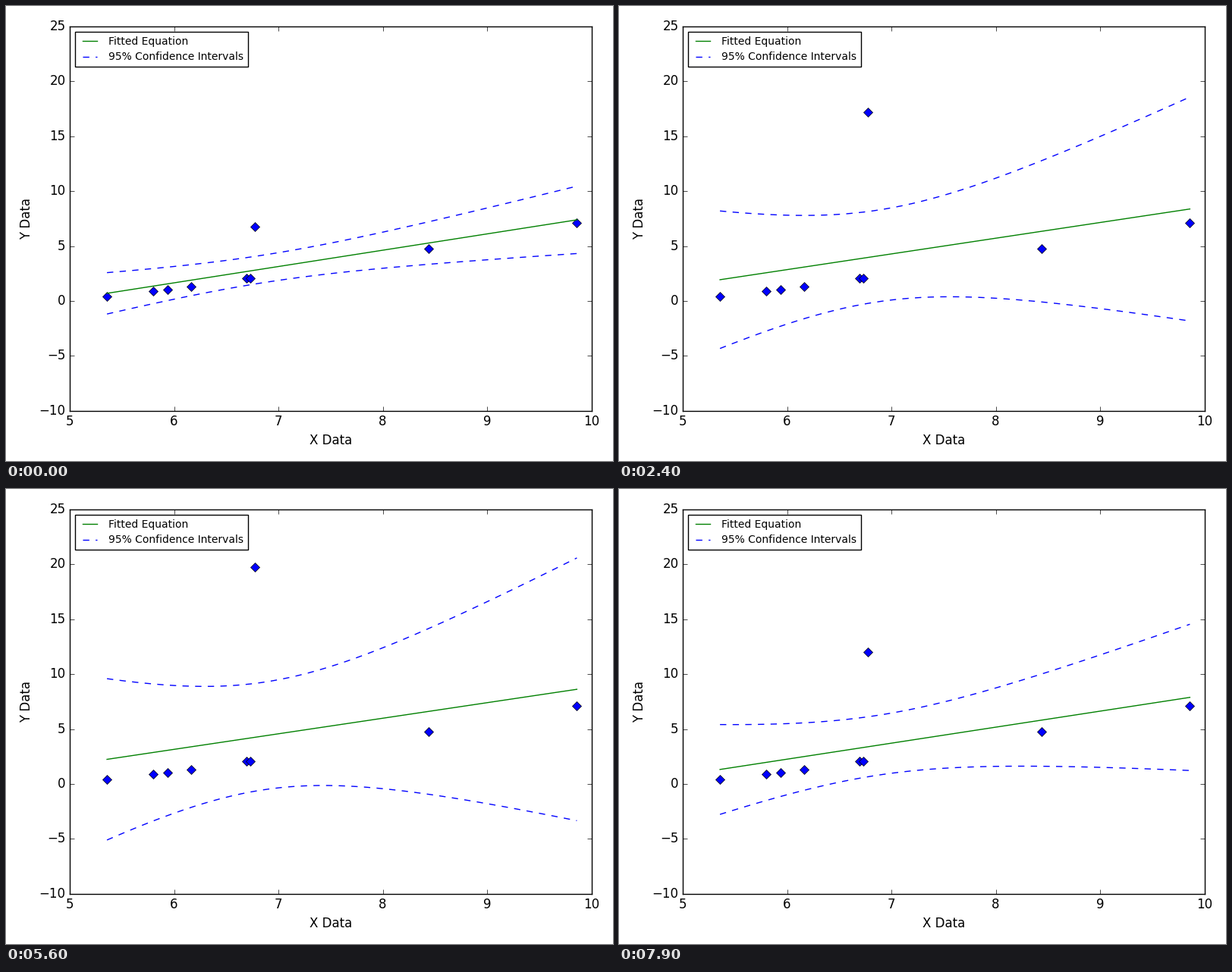
Write a matplotlib script that moves like this. It is 800 by 600 pixels and loops after 8 s.

```python
import numpy as np
import matplotlib.pyplot as plt
from matplotlib.animation import FuncAnimation

FRAMES = 80
INTERVAL = 100
T_95 = 2.364624  # two-sided 95% Student t, 7 degrees of freedom

X = np.array([5.357, 5.797, 5.936, 6.161, 6.697, 6.731, 6.775, 8.442, 9.861])
Y = np.array([0.376, 0.874, 1.049, 1.327, 2.054, 2.077, 2.138, 4.744, 7.104])
MOVING = 6
CENTER, SWING = 6.76, 14.0

plt.style.use("classic")
plt.rcParams["font.family"] = "DejaVu Sans"

WIDTH, HEIGHT, DPI = 800, 600, 100
LEFT, RIGHT, TOP, BOTTOM = 84, 771.5, 27, 533.7

fig = plt.figure(figsize=(WIDTH / DPI, HEIGHT / DPI), dpi=DPI, facecolor="white")
ax = fig.add_axes([LEFT / WIDTH, 1 - BOTTOM / HEIGHT,
                   (RIGHT - LEFT) / WIDTH, (BOTTOM - TOP) / HEIGHT])
ax.set(xlim=(5, 10), ylim=(-10, 25), xlabel="X Data", ylabel="Y Data")
ax.set_xticks(range(5, 11))
ax.set_yticks(range(-10, 26, 5))

grid = np.linspace(X.min(), X.max())
points, = ax.plot(X, Y, "bD")
fit_line, = ax.plot(grid, grid, "g", label="Fitted Equation")
lower, = ax.plot(grid, grid, "b--", label="95% Confidence Intervals")
upper, = ax.plot(grid, grid, "b--")
ax.legend(loc="upper left", fontsize=10)


def fit(y):
    """Least-squares line on the grid and its confidence half-width."""
    dx = X - X.mean()
    sxx = dx @ dx
    slope = dx @ y / sxx
    resid = y - y.mean() - slope * dx
    s = np.sqrt(resid @ resid / (len(X) - 2))
    g = grid - X.mean()
    return y.mean() + slope * g, T_95 * s * np.sqrt(1 / len(X) + g**2 / sxx)


def update(i):
    y = Y.copy()
    y[MOVING] = CENTER + SWING * np.sin(np.radians(2 * i))
    model, half = fit(y)
    points.set_ydata(y)
    fit_line.set_ydata(model)
    lower.set_ydata(model - half)
    upper.set_ydata(model + half)
    return points, fit_line, lower, upper


anim = FuncAnimation(fig, update, frames=FRAMES, interval=INTERVAL,
                     repeat=True, repeat_delay=0)
plt.show()
```
